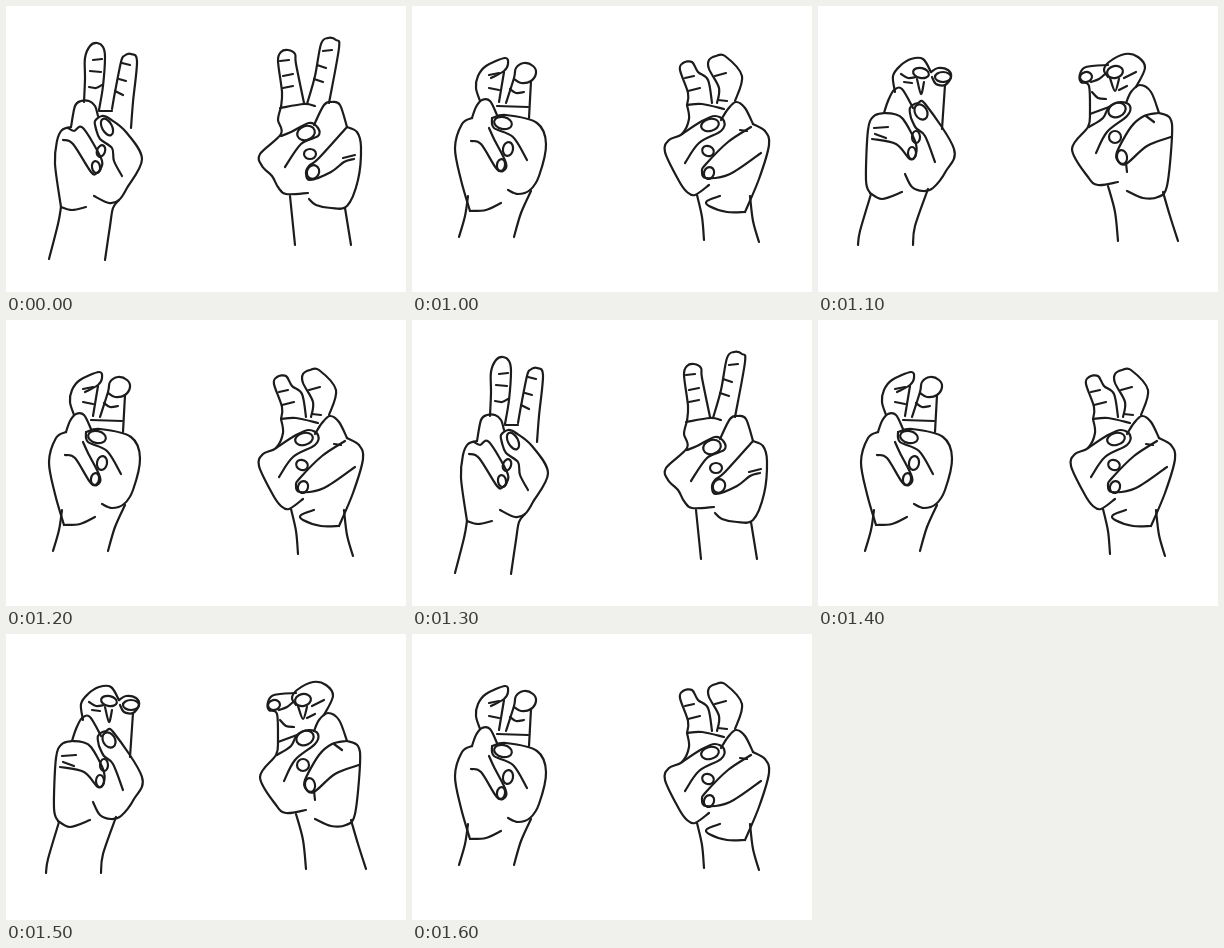
An HTML page with a canvas for the animation above (1.7 s loop, 400x286 px).

```html
<!DOCTYPE html>
<html lang="en">
<head>
<meta charset="utf-8">
<title>Air quotes</title>
<style>
html, body { margin: 0; width: 100%; height: 100%; overflow: hidden; background: #fff; }
canvas { display: block; }
</style>
</head>
<body>
<canvas id="stage" width="400" height="286"></canvas>
<script>
const ctx = document.getElementById('stage').getContext('2d');

// Smooth curve through x, y pairs; two pairs give a straight line.
function curve(...n) {
  const last = n.length / 2 - 1;
  const at = (i, axis) => n[2 * Math.max(0, Math.min(last, i)) + axis];
  const handle = (i, sign, axis) => at(i, axis) + sign * (at(i + 1, axis) - at(i - 1, axis)) / 6;
  ctx.beginPath();
  ctx.moveTo(n[0], n[1]);
  for (let i = 0; i < last; i++) {
    ctx.bezierCurveTo(
      handle(i, 1, 0), handle(i, 1, 1),
      handle(i + 1, -1, 0), handle(i + 1, -1, 1),
      at(i + 1, 0), at(i + 1, 1)
    );
  }
  ctx.stroke();
}

function oval(x, y, rx, ry, tilt = 0) {
  ctx.beginPath();
  ctx.ellipse(x, y, rx, ry, tilt * Math.PI / 180, 0, Math.PI * 2);
  ctx.stroke();
}

function straightLeft() {
  // Fingers
  curve(78, 96, 79, 73, 79, 52, 84, 40, 91, 37, 97, 41, 99, 51, 97, 80, 93, 104);
  curve(106, 103, 109, 86, 115, 56, 118, 50, 125, 48, 131, 55, 127, 96, 125, 122);
  curve(87, 54, 96, 53);
  curve(84, 65, 95, 66);
  curve(83, 81, 90, 82, 96, 79);
  curve(116, 57, 124, 59);
  curve(113, 73, 120, 75);
  curve(109, 85, 117, 89);
  curve(93, 105, 106, 105);
  // Palm and wrist
  curve(65, 121, 69, 100, 75, 95, 83, 95, 89, 100, 92, 110);
  curve(65, 121, 56, 124, 51, 135, 49, 158, 55, 201);
  curve(55, 201, 52, 218, 43, 253);
  curve(55, 201, 66, 204, 80, 201);
  curve(113, 194, 107, 202, 104, 220, 99, 254);
  // Thumb
  curve(90, 123, 89, 115, 96, 110, 104, 113, 120, 126, 136, 153, 121, 182, 113, 194, 103, 197, 88, 190);
  curve(90, 123, 94, 133, 106, 142, 108, 155, 116, 170);
  oval(101, 121, 5, 9, -28);
  // Little finger
  curve(62, 122, 68, 125, 77, 122, 95, 152, 95, 162, 91, 167, 85, 166, 67, 138, 57, 134);
  oval(90, 161, 4, 6, -10);
  oval(95, 145, 4, 6, 20);
}

function straightRight() {
  curve(275, 101, 276, 86, 272, 55, 275, 46, 282, 44, 289, 48, 290, 58, 298, 97);
  curve(301, 98, 309, 70, 315, 38, 322, 32, 330, 34, 333, 42, 323, 97);
  curve(274, 55, 283, 54);
  curve(277, 70, 287, 68);
  curve(277, 82, 287, 80);
  curve(317, 45, 326, 44);
  curve(311, 59, 320, 62);
  curve(308, 73, 317, 76);
  curve(274, 102, 298, 98, 309, 100);

  curve(308, 119, 318, 99, 326, 96, 334, 99, 341, 121);
  curve(341, 121, 351, 126, 355, 141, 352, 174, 341, 200, 325, 202, 310, 199, 303, 193);
  curve(284, 190, 289, 239);
  curve(339, 202, 345, 239);

  curve(275, 101, 272, 114, 275, 128, 254, 148, 256, 160, 266, 170, 272, 181, 280, 188, 302, 187);
  curve(275, 130, 285, 126, 303, 117, 312, 122, 312, 130, 295, 138, 279, 161);
  oval(300, 127, 9, 7, -18);

  curve(341, 121, 313, 152, 303, 160, 300, 167, 304, 174, 325, 166, 338, 156, 348, 153);
  curve(337, 152, 349, 149);
  oval(307, 166, 6, 7, 25);
  oval(304, 148, 6, 5);
}

function bentLeft() {
  curve(68, 95, 64, 82, 66, 70, 74, 60, 93, 52, 96, 58, 92, 65, 79, 72);
  curve(92, 66, 87, 96);
  curve(77, 69, 87, 67);
  curve(77, 82, 87, 84);
  curve(94, 97, 102, 72, 104, 62, 112, 57, 121, 60, 124, 67, 119, 75, 109, 77, 102, 73);
  curve(119, 75, 117, 112);
  curve(98, 83, 104, 87, 112, 86);
  curve(85, 100, 116, 101);

  curve(60, 112, 64, 101, 70, 94, 78, 95, 85, 109);
  curve(60, 112, 50, 118, 43, 142, 49, 174, 58, 205);
  curve(58, 205, 74, 204, 89, 197);
  curve(56, 190, 53, 210, 47, 231);
  curve(119, 185, 109, 207, 102, 231);

  curve(80, 112, 94, 109, 125, 117, 134, 138, 127, 170, 118, 184, 106, 188, 96, 184);
  curve(80, 112, 82, 122, 101, 131, 115, 154);
  oval(91, 117, 9, 6, 12);

  curve(59, 135, 69, 138, 84, 162, 91, 165, 94, 157, 82, 133, 77, 122);
  oval(89, 159, 4, 6, 10);
  oval(96, 143, 5, 7, 10);
}

function bentRight() {
  curve(275, 99, 276, 87, 268, 64, 271, 57, 280, 56, 286, 66, 296, 74, 300, 97);
  curve(273, 72, 282, 70);
  curve(276, 85, 288, 82);
  curve(305, 97, 307, 82, 297, 63, 297, 54, 304, 50, 313, 50, 330, 70, 323, 95);
  curve(303, 70, 314, 67);
  curve(306, 94, 315, 95);
  curve(275, 99, 290, 98, 312, 103);

  curve(309, 114, 316, 103, 324, 96, 333, 102, 341, 118);
  curve(341, 118, 353, 125, 357, 139, 347, 173, 333, 206);
  curve(333, 206, 315, 206, 297, 200, 295, 195, 308, 190);
  curve(285, 189, 290, 211, 292, 234);
  curve(338, 190, 341, 215, 347, 236);

  curve(275, 99, 277, 113, 270, 128, 257, 134, 253, 146, 267, 175, 275, 186, 283, 189, 297, 179);
  curve(270, 128, 290, 115, 303, 110, 312, 115, 309, 125, 287, 137, 273, 157);
  oval(298, 119, 9, 6, -15);

  curve(339, 121, 316, 136, 294, 158, 290, 165, 294, 172, 318, 168, 349, 147);
  curve(328, 124, 335, 125);
  oval(297, 167, 5, 6, 20);
  oval(296, 145, 6, 5, 25);
}

function curledLeft() {
  curve(77, 86, 75, 70, 82, 60, 93, 53, 105, 53, 113, 66);
  curve(83, 68, 90, 72, 98, 71);
  curve(86, 76, 94, 77);
  curve(99, 73, 103, 88, 106, 76);
  curve(113, 66, 120, 62, 130, 64, 133, 71, 127, 79, 118, 78, 114, 71);
  curve(127, 79, 124, 123);
  oval(103, 67, 8, 5, 12);
  oval(125, 71, 8, 5);

  curve(66, 107, 70, 95, 76, 84, 84, 83, 95, 102);
  curve(66, 107, 56, 110, 50, 124, 48, 174, 52, 187);
  curve(52, 187, 64, 193, 84, 186);
  curve(53, 188, 42, 225, 40, 239);
  curve(110, 183, 97, 220, 95, 239);

  curve(93, 112, 92, 102, 100, 97, 108, 99, 136, 143, 128, 165, 115, 182, 105, 185, 94, 181, 87, 168);
  curve(93, 112, 98, 122, 107, 130, 117, 156);
  oval(103, 106, 6, 8, -30);

  curve(66, 107, 76, 108, 85, 113, 97, 135, 98, 148, 92, 153, 78, 138, 54, 133);
  curve(56, 122, 70, 121);
  curve(57, 128, 68, 132);
  oval(94, 147, 4, 6);
  oval(98, 131, 4, 6);
}

function curledRight() {
  curve(272, 108, 271, 80, 263, 76, 262, 68, 268, 61, 290, 59);
  curve(273, 76, 281, 73, 287, 68);
  curve(290, 71, 286, 64, 291, 56, 307, 48, 320, 51, 327, 62, 318, 81);
  curve(292, 72, 297, 85, 301, 73);
  curve(306, 72, 318, 66);
  curve(274, 86, 280, 92, 288, 93);
  curve(301, 84, 309, 80);
  oval(268, 71, 6, 5, -10);
  oval(297, 66, 8, 6, -12);

  curve(308, 97, 313, 86, 322, 79, 333, 86, 341, 107);
  curve(341, 107, 352, 112, 354, 130, 349, 180, 340, 191, 325, 192, 309, 185);
  curve(290, 180, 297, 206, 300, 235);
  curve(345, 186, 352, 210, 360, 235);

  curve(272, 108, 270, 121, 254, 143, 270, 171, 280, 179, 300, 176);
  curve(272, 108, 291, 101);
  curve(271, 121, 285, 112, 291, 101, 303, 96, 312, 100, 309, 110, 289, 126, 278, 147);
  oval(299, 104, 9, 7, -25);

  curve(340, 107, 326, 110, 313, 121, 299, 146, 300, 155, 308, 158, 329, 140, 353, 131);
  curve(328, 110, 336, 116);
  curve(308, 157, 309, 166);
  oval(304, 151, 5, 7, -10);
  oval(297, 131, 6, 6);
}

const straight = [straightLeft, straightRight];
const bent = [bentLeft, bentRight];
const curled = [curledLeft, curledRight];
const cycle = [straight, bent, curled, bent];
const start = performance.now();

function draw(now) {
  const t = Math.max(0, now - start) % 1700;
  const step = t < 1000 ? 0 : Math.floor((t - 900) / 100);
  ctx.fillStyle = '#fff';
  ctx.fillRect(0, 0, 400, 286);
  ctx.strokeStyle = '#1c1c1c';
  ctx.lineWidth = 2.2;
  ctx.lineJoin = ctx.lineCap = 'round';
  cycle[step % cycle.length].forEach(hand => hand());
  requestAnimationFrame(draw);
}
draw(start);
</script>
</body>
</html>
```
